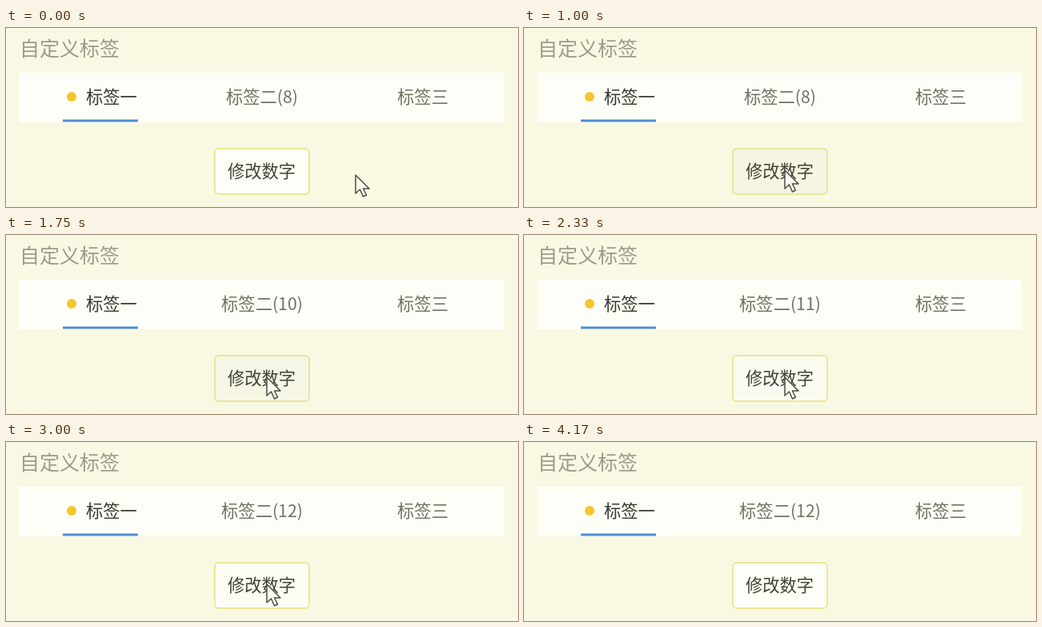
These frames come from a looping animation (640 by 224 pixels, 4260 ms). An HTML page:

```html
<!DOCTYPE html>
<html lang="zh-CN">
<head>
<meta charset="utf-8">
<style>
  html, body { margin: 0; width: 100%; height: 100%; overflow: hidden; background: #f9f9e3; }
  svg { display: block; width: 640px; height: 224px; }
  text { font: 21.3px "Noto Sans CJK SC", "Noto Sans CJK", "Noto Sans", sans-serif; }
  .title { font-size: 25px; fill: #9b9b8c; }
  .tab { fill: #717163; text-anchor: middle; }
  .label { fill: #424235; text-anchor: middle; }
</style>
</head>
<body>
<svg viewBox="0 0 640 224">
  <text class="title" x="17" y="34.5">自定义标签</text>
  <rect x="16" y="56" width="606" height="62" fill="#fefef8"/>
  <circle cx="82" cy="86" r="6" fill="#f5c52c"/>
  <text x="100" y="94" fill="#38382c">标签一</text>
  <text class="tab" id="counter" x="320" y="94"></text>
  <text class="tab" x="521" y="94">标签三</text>
  <rect x="71" y="114.5" width="94" height="3" fill="#4d8fd3"/>
  <rect x="261" y="151" width="118" height="57" rx="5" fill="#fefef8" stroke="#e9e996" stroke-width="2"/>
  <rect id="shade" x="260" y="150" width="120" height="59" rx="6" fill="#e0e0b4"/>
  <text class="label" x="319.5" y="187">修改数字</text>
  <path id="cursor" d="M0 0V23L5.5 18L9.5 27L13.5 25L9.5 17H17Z"
        fill="#fbfbf0" stroke="#4c4c42" stroke-width="1.5" stroke-linejoin="round"/>
</svg>
<script>
const LOOP = 4260, STEP = 1000 / 12, FADE = 250;
const $ = id => document.getElementById(id);
const counter = $('counter'), shade = $('shade'), cursor = $('cursor');

const clamp = v => Math.min(1, Math.max(0, v));
const easeOut = v => Math.sin(clamp(v) * Math.PI / 2);

// Mouse button down and up times
const presses = [[915, 1080], [1415, 1665], [2165, 2248], [2500, 2831]];

function pointer(t) {
  const enter = 1 - easeOut((t - 83) / 667);
  const leave = easeOut((t - 3250) / 600);
  return [326 + 111 * enter + 319 * leave, 178 + 6 * enter - 18 * leave];
}

// The shade builds up while held and eases away after release
function shadeAt(t) {
  return Math.max(...presses.map(([down, up]) => {
    const held = clamp((Math.min(t, up) - down) / FADE);
    return held * (1 - clamp((t - up) / FADE)) ** 3;
  }));
}

function draw(now) {
  const t = Math.floor((now % LOOP + 4) / STEP) * STEP;
  const label = `标签二(${8 + presses.filter(([, up]) => t >= up).length})`;
  if (counter.textContent !== label) counter.textContent = label;
  shade.setAttribute('opacity', shadeAt(t));
  cursor.setAttribute('transform', `translate(${pointer(t)})`);
}

const start = performance.now();
function tick() {
  draw(performance.now() - start);
  requestAnimationFrame(tick);
}
tick();
</script>
</body>
</html>
```
